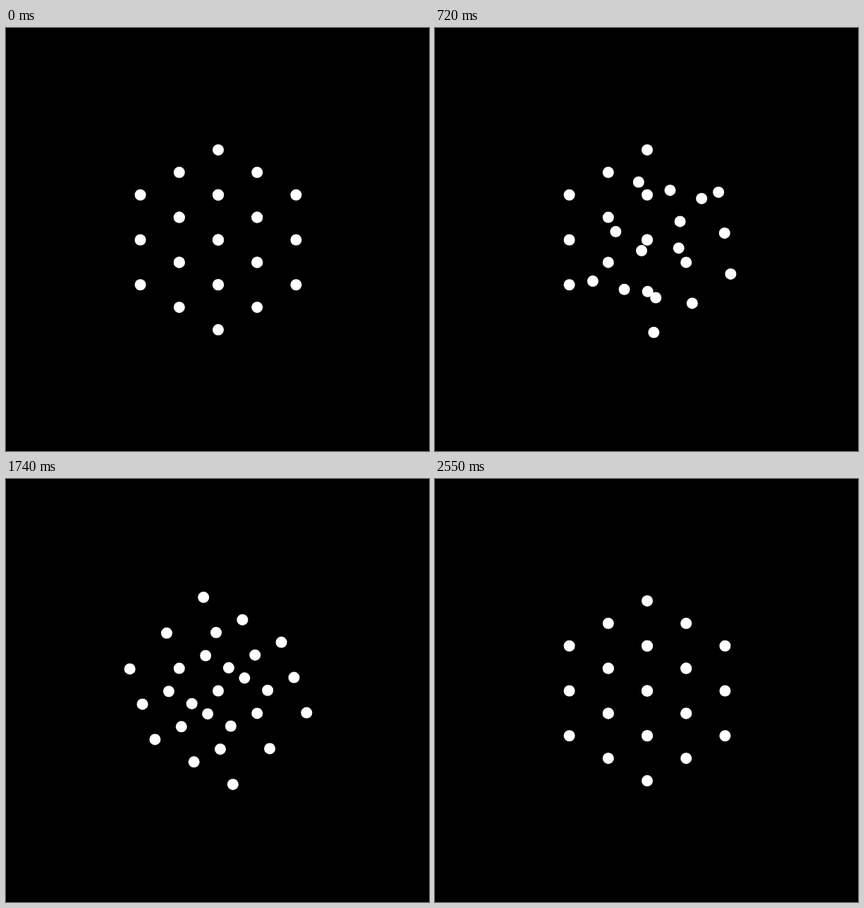
These frames come from a looping animation (600 by 600 pixels, 2.73 s). An HTML page with a canvas:

```html
<!DOCTYPE html>
<html lang="en">
<head>
<meta charset="utf-8">
<title>Turning lattice</title>
<style>
  html, body { margin: 0; width: 100%; height: 100%; overflow: hidden; background: #000; }
  canvas { display: block; width: 600px; height: 600px; }
</style>
</head>
<body>
<canvas id="stage" width="600" height="600"></canvas>
<script>
const ctx = document.getElementById('stage').getContext('2d');

const LOOP = 2730, STEP = 30;
const SLICES_END = 1350, TURN_END = 2550;
const CX = 301, CY = 300.5, RADIUS = 8;
const EDGE = 78.1;
const H = EDGE * Math.SQRT1_2;      // isometric x per unit
const V = EDGE / Math.sqrt(6);      // isometric y per unit
const RIGHT = Math.PI / 2;
const UNITS = [-1, 0, 1];

const clamp = (v, lo, hi) => Math.min(hi, Math.max(lo, v));
const smooth = p => p * p * (3 - 2 * p);
const turnEase = p => p * p * (2.46 - 1.46 * p);   // soft start, brisk stop

// Turn of the slice at x: first staggered by half a turn each, then all together.
function angle(x, t) {
  if (t < SLICES_END) {
    const sweep = 2 * smooth(t / SLICES_END);
    return RIGHT * clamp(sweep - (x + 1) / 2, 0, 1);
  }
  const p = clamp((t - SLICES_END) / (TURN_END - SLICES_END), 0, 1);
  return RIGHT * turnEase(p);
}

function dot(x, y, z) {
  ctx.beginPath();
  ctx.arc(CX + (x - y) * H, CY + (x + y - 2 * z) * V, RADIUS, 0, 2 * Math.PI);
  ctx.fill();
}

function draw(t) {
  ctx.fillStyle = '#000';
  ctx.fillRect(0, 0, 600, 600);
  ctx.fillStyle = '#fff';
  for (const x of UNITS) {
    const a = angle(x, t), c = Math.cos(a), s = Math.sin(a);
    for (const y of UNITS)
      for (const z of UNITS) dot(x, y * c + z * s, z * c - y * s);
  }
}

const start = performance.now();
function tick() {
  const t = (performance.now() - start) % LOOP;
  draw(Math.floor(t / STEP) * STEP);
  requestAnimationFrame(tick);
}
tick();
</script>
</body>
</html>
```
